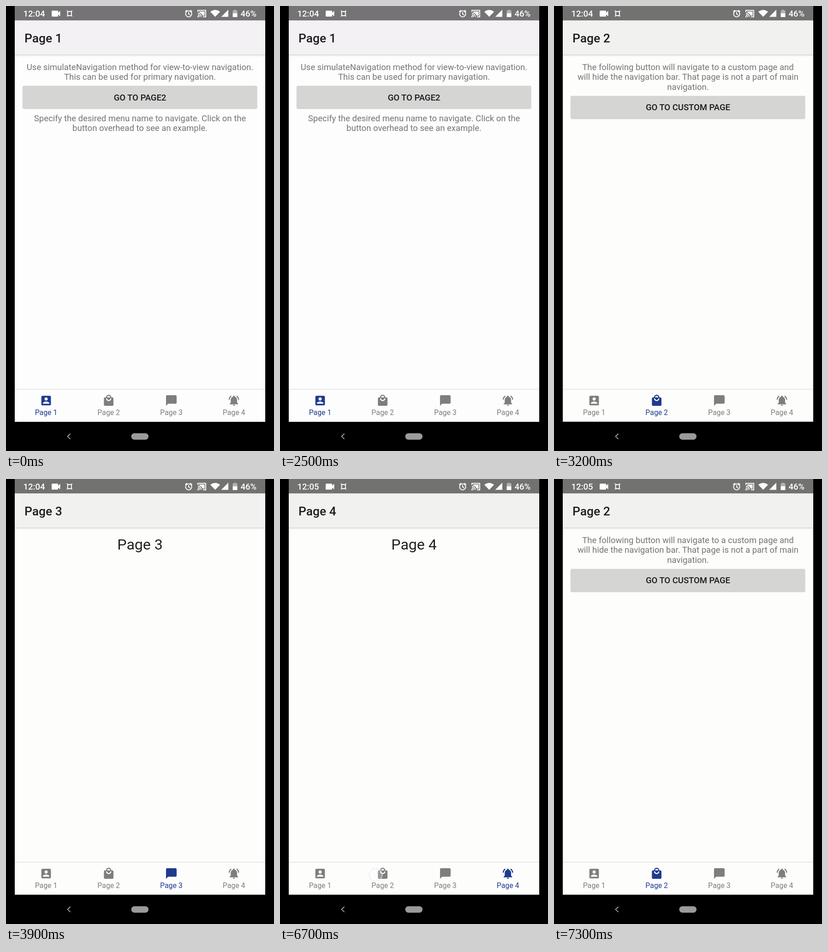
An HTML page for the animation above (8000 ms loop, 581 by 965 pixels).

```html
<!DOCTYPE html>
<html lang="en">
<head>
<meta charset="utf-8">
<title>Bottom navigation</title>
<style>
  html, body { margin: 0; width: 100%; height: 100%; overflow: hidden; background: #000; }
  svg { display: block; width: 581px; height: 965px; font-family: Roboto, sans-serif; }

  .medium { font-weight: 500; }
  .title { font-size: 26.4px; font-weight: 500; fill: #1d1d1d; }
  .body { font-size: 18.5px; fill: #757575; text-anchor: middle; }
  .caption { font-size: 18.5px; font-weight: 500; fill: #1b1b1b; text-anchor: middle; }
  .heading { font-size: 32px; fill: #202020; text-anchor: middle; }
  .button { fill: #d5d5d4; filter: drop-shadow(0 1px 1px rgba(0, 0, 0, .28)); }
  .status { fill: #fff; font-size: 18.5px; font-weight: 500; }
  .line { fill: none; stroke: #fff; stroke-width: 1.9; }
  .tab { font-size: 15.85px; text-anchor: middle; fill: #7e7e7e; }

  .page, .tab, .timed { animation: 8s step-end infinite; }
  .page, .timed { opacity: 0; }
  #page1 { animation-name: page1; }
  #page2 { animation-name: page2; }
  #page3 { animation-name: page3; }
  #page4 { animation-name: page4; }
  #tab1 { animation-name: tab1; }
  #tab2 { animation-name: tab2; }
  #tab3 { animation-name: tab3; }
  #tab4 { animation-name: tab4; }
  #before { animation-name: before; }
  #after { animation-name: after; }
  #touch { animation-name: touch; }

  @keyframes page1 { 0% { opacity: 1 } 32.5%, 100% { opacity: 0 } }
  @keyframes page2 {
    0% { opacity: 0 } 32.5% { opacity: 1 } 48.75% { opacity: 0 }
    85% { opacity: .57 } 86.25% { opacity: .95 } 87.5%, 100% { opacity: 1 }
  }
  @keyframes page3 { 0% { opacity: 0 } 48.75% { opacity: 1 } 62.5%, 100% { opacity: 0 } }
  @keyframes page4 {
    0% { opacity: 0 } 62.5% { opacity: 1 }
    85% { opacity: .43 } 86.25% { opacity: .05 } 87.5%, 100% { opacity: 0 }
  }
  @keyframes tab1 { 0% { fill: #1f3b8f } 32.5%, 100% { fill: #7e7e7e } }
  @keyframes tab2 {
    0% { fill: #7e7e7e } 32.5% { fill: #1f3b8f }
    48.75% { fill: #7e7e7e } 85%, 100% { fill: #1f3b8f }
  }
  @keyframes tab3 { 0% { fill: #7e7e7e } 48.75% { fill: #1f3b8f } 62.5%, 100% { fill: #7e7e7e } }
  @keyframes tab4 { 0% { fill: #7e7e7e } 62.5% { fill: #1f3b8f } 85%, 100% { fill: #7e7e7e } }
  @keyframes before { 0% { opacity: 1 } 82.5%, 100% { opacity: 0 } }
  @keyframes after { 0% { opacity: 0 } 82.5%, 100% { opacity: 1 } }
  @keyframes touch { 0% { opacity: 0 } 83.75% { opacity: 1 } 86.25%, 100% { opacity: 0 } }
</style>
</head>
<body>
<svg viewBox="0 0 581 965">
  <defs>
    <linearGradient id="shade" x2="0" y2="1">
      <stop offset="0" stop-color="#000" stop-opacity=".13"/>
      <stop offset="1" stop-color="#000" stop-opacity="0"/>
    </linearGradient>
  </defs>

  <rect width="581" height="965"/>
  <rect x="19" width="543" height="901.5" fill="#fdfefc"/>
  <rect x="19" width="543" height="31.5" fill="#727371"/>
  <rect x="19" y="31.5" width="543" height="74" fill="#f1f2f0"/>

  <g id="page1" class="page">
    <rect x="19" width="543" height="901.5" fill="#fefdfe"/>
    <rect x="19" width="543" height="31.5" fill="#757375"/>
    <rect x="19" y="31.5" width="543" height="74" fill="#f3f1f4"/>
    <text class="title" x="40" y="79">Page 1</text>
    <text class="body" x="290.5" y="138.7">Use simulateNavigation method for view-to-view navigation.</text>
    <text class="body" x="290.5" y="160.4">This can be used for primary navigation.</text>
    <rect class="button" x="36.5" y="173" width="507.5" height="48.5" rx="2"/>
    <text class="caption" x="290.5" y="204.7">GO TO PAGE2</text>
    <text class="body" x="290.5" y="249.5">Specify the desired menu name to navigate. Click on the</text>
    <text class="body" x="290.5" y="271.2">button overhead to see an example.</text>
  </g>

  <g id="page2" class="page">
    <text class="title" x="40" y="79">Page 2</text>
    <text class="body" x="290.5" y="138.7">The following button will navigate to a custom page and</text>
    <text class="body" x="290.5" y="160.4">will hide the navigation bar. That page is not a part of main</text>
    <text class="body" x="290.5" y="182.1">navigation.</text>
    <rect class="button" x="36.5" y="195" width="507.5" height="48.5" rx="2"/>
    <text class="caption" x="290.5" y="226.3">GO TO CUSTOM PAGE</text>
  </g>

  <g id="page3" class="page">
    <text class="title" x="40" y="79">Page 3</text>
    <text class="heading" x="290.5" y="152.5">Page 3</text>
  </g>

  <g id="page4" class="page">
    <text class="title" x="40" y="79">Page 4</text>
    <text class="heading" x="290.5" y="152.5">Page 4</text>
  </g>

  <rect x="19" y="105" width="543" height="5" fill="url(#shade)"/>
  <rect x="19" y="830" width="543" height="2" fill="#e7e8e7"/>

  <!-- Status bar -->
  <g class="status">
    <text id="before" class="timed" x="37.5" y="23">12:04</text>
    <text id="after" class="timed" x="37.5" y="23">12:05</text>
    <path d="M100.5 10h11q1.5 0 1.5 1.5v3l4.5-4v12l-4.5-4v3q0 1.500-1.500 1.500h-11q-1.500 0-1.500-1.500v-10q0-1.500 1.500-1.500z"/>
    <rect class="line" x="133.500" y="12" width="8.500" height="9" rx="3"/>
    <path class="line" stroke-width="1.500" d="M134 12l-2-2M141.500 12l2-2M134 21l-2 1.500M141.500 21l2 1.500"/>
    <circle class="line" cx="396" cy="17" r="6.600"/>
    <path class="line" d="M396 13v4.500l3.300 2M388.500 12.500l4-3.500M403.500 12.500l-4-3.500"/>
    <path class="line" d="M416 13v-3.500h17v14h-6M416 16a7.500 7.500 0 0 1 7.500 7.500M416 19.500a4 4 0 0 1 4 4"/>
    <path d="M415 21.500a3 3 0 0 1 3 3h-3zM419 12h11.500v9h-4q-2-5-7.500-7z"/>
    <path d="M443 12.500q10.500-8 21 0l-10.500 11z"/>
    <path d="M482 8v15.500h-15.500z"/>
    <path d="M494.500 8h4v1.500h3v6h-10v-6h3z" fill="#b3b3b2"/>
    <path d="M491.500 15.500h10v8.500h-10z"/>
    <text x="508.500" y="23">46%</text>
  </g>

  <!-- Bottom tabs -->
  <g id="tab1" class="tab">
    <path transform="translate(73.2 841.8) scale(1.15)" d="M3 5v14c0 1.1.89 2 2 2h14c1.1 0 2-.9 2-2V5c0-1.1-.9-2-2-2H5c-1.11 0-2 .9-2 2zm12 4c0 1.66-1.34 3-3 3s-3-1.34-3-3 1.34-3 3-3 3 1.34 3 3zm-9 8c0-2 4-3.1 6-3.1s6 1.1 6 3.1v1H6v-1z"/>
    <text x="87" y="886.700">Page 1</text>
  </g>
  <g id="tab2" class="tab">
    <path transform="translate(208.8 841.8) scale(1.15)" d="M19 6h-2c0-2.76-2.24-5-5-5S7 3.24 7 6H5c-1.1 0-1.99.9-1.99 2L3 20c0 1.1.9 2 2 2h14c1.1 0 2-.9 2-2V8c0-1.1-.9-2-2-2zm-7-3c1.66 0 3 1.34 3 3H9c0-1.66 1.34-3 3-3zm0 10c-2.76 0-5-2.24-5-5h2c0 1.66 1.34 3 3 3s3-1.34 3-3h2c0 2.76-2.24 5-5 5z"/>
    <text x="222.700" y="886.700">Page 2</text>
  </g>
  <g id="tab3" class="tab">
    <path transform="translate(344.6 841.8) scale(1.15)" d="M20 2H4c-1.1 0-2 .9-2 2v18l4-4h14c1.1 0 2-.9 2-2V4c0-1.1-.9-2-2-2z"/>
    <text x="358.400" y="886.700">Page 3</text>
  </g>
  <g id="tab4" class="tab">
    <path transform="translate(480.3 841.8) scale(1.15)" d="M7.58 4.08L6.15 2.65C3.75 4.48 2.17 7.3 2.03 10.5h2c.15-2.65 1.51-4.97 3.55-6.42zm12.39 6.42h2c-.15-3.2-1.73-6.02-4.12-7.85l-1.42 1.43c2.02 1.45 3.39 3.77 3.54 6.42zM18 11c0-3.07-1.64-5.64-4.5-6.32V4c0-.83-.67-1.5-1.5-1.5s-1.5.67-1.5 1.5v.68C7.63 5.36 6 7.92 6 11v5l-2 2v1h16v-1l-2-2v-5zm-6 11c1.100 0 2-.9 2-2h-4c0 1.100.9 2 2 2z"/>
    <text x="494.100" y="886.700">Page 4</text>
  </g>
  <circle id="touch" class="timed" cx="207.500" cy="858.500" r="14" fill="#fff" fill-opacity=".2" stroke="#e4e8f0" stroke-opacity=".65" stroke-width="2"/>

  <!-- System navigation -->
  <path d="M139.500 927.500l-6 5.800 6 5.800" fill="none" stroke="#a3a3a3" stroke-width="1.800"/>
  <rect x="271.500" y="926.500" width="37.500" height="14" rx="7" fill="#9b9b9b"/>
</svg>
</body>
</html>
```
